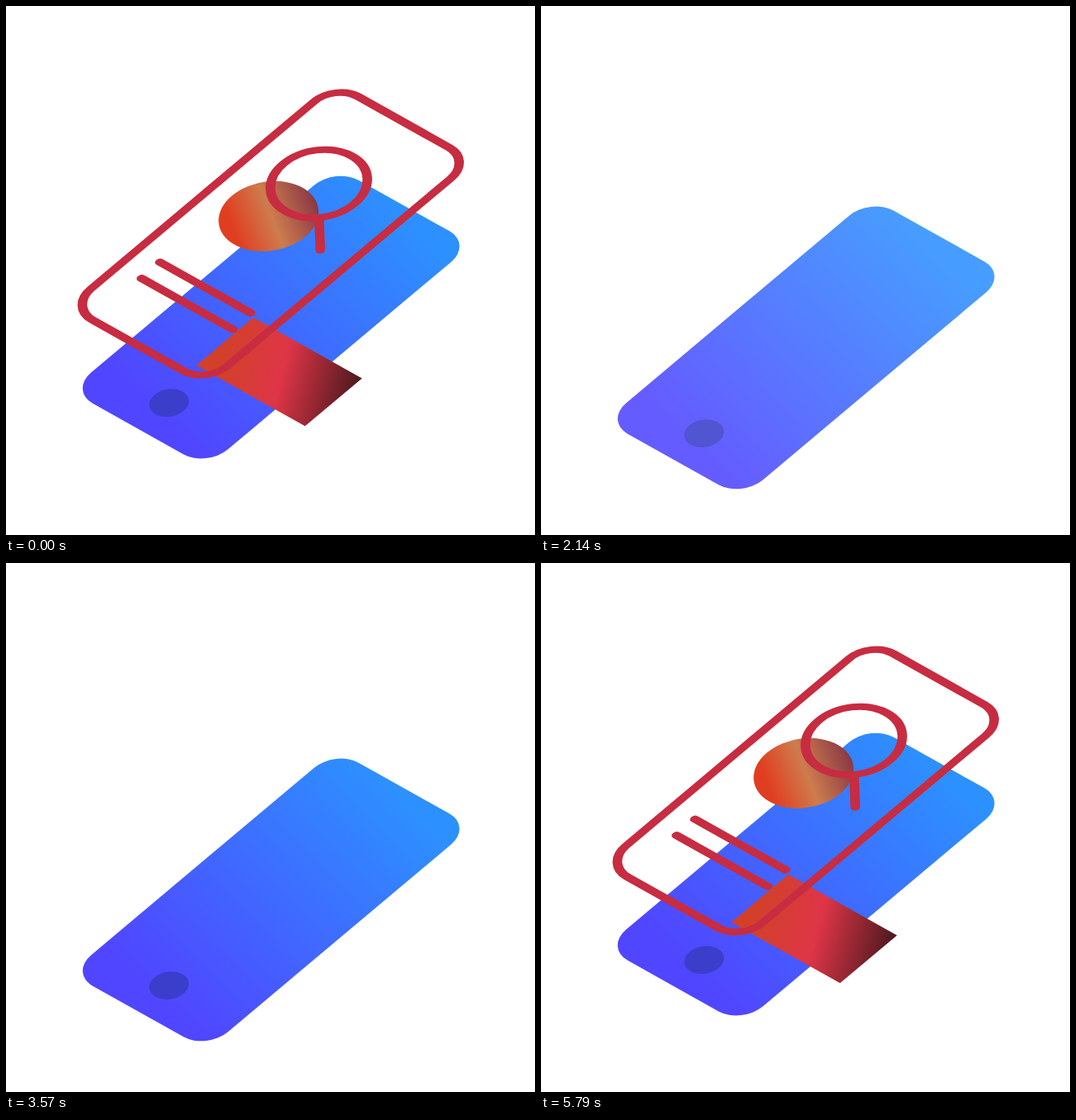
An HTML page that plays this animation: 640x640 px, repeating every 6000 ms.

```html
<!DOCTYPE html>
<html lang="en">
<head>
<meta charset="utf-8">
<title>Phone layers</title>
<style>
  html, body { margin: 0; width: 100%; height: 100%; overflow: hidden; background: #fff; }
  svg { display: block; width: 100%; height: 100%; }
  #lines { fill: none; stroke: #c72c41; stroke-width: 11.6; stroke-linecap: round; }
</style>
</head>
<body>
<svg viewBox="0 0 640 640">
  <defs>
    <linearGradient id="blue" gradientUnits="userSpaceOnUse" x1="-190" y1="-47" x2="215" y2="53">
      <stop offset="0" stop-color="#5046ff"/>
      <stop offset="1" stop-color="#2d90ff"/>
    </linearGradient>
    <linearGradient id="orange" gradientUnits="userSpaceOnUse" x1="-51" y1="-32.5" x2="51" y2="32.5">
      <stop offset=".12" stop-color="#e03e20"/>
      <stop offset=".53" stop-color="#cd7c4e"/>
      <stop offset="1" stop-color="#8a3844"/>
    </linearGradient>
    <linearGradient id="red" gradientUnits="userSpaceOnUse" x1="-55" y1="-88" x2="55" y2="88">
      <stop offset=".15" stop-color="#d2402a"/>
      <stop offset=".52" stop-color="#de3547"/>
      <stop offset=".97" stop-color="#541a20"/>
    </linearGradient>
  </defs>

  <g id="phone">
    <rect x="-236.5" y="-113" width="473" height="226" rx="38" fill="url(#blue)"/>
    <circle cx="-181.5" cy="0" r="24" fill="#3a3ecb"/>
  </g>
  <circle id="disc" r="60.5" fill="url(#orange)"/>
  <rect id="card" x="-50.7" y="-89.7" width="101.4" height="179.4" fill="url(#red)"/>
  <g id="lines">
    <path pathLength="1" d="M198.5 113H-198.5A38 38 0 0 1 -236.5 75V-75A38 38 0 0 1 -198.5 -113H198.5A38 38 0 0 1 236.5 -75V75A38 38 0 0 1 198.5 113"/>
    <circle pathLength="1" cx="97.8" cy="-11.3" r="58.6"/>
    <path pathLength="1" d="M14.3 68.6L53.3 30.3"/>
    <path pathLength="1" d="M-115 -76.5V73.5"/>
    <path pathLength="1" d="M-148.7 -75.5V75.5"/>
  </g>
</svg>
<script>
  const LOOP = 6000;
  const [phone, disc, card, lines] = ["phone", "disc", "card", "lines"].map(id => document.getElementById(id));

  // Smooth 0 to 1 ramp
  function ramp(t, start, duration) {
    const x = Math.min(1, Math.max(0, (t - start) / duration));
    return x * x * (3 - 2 * x);
  }

  // Every part lies on the same isometric plane
  function place(node, x, y, opacity = 1) {
    node.setAttribute("transform", `matrix(.68 -.571 .733 .4105 ${x} ${y})`);
    node.setAttribute("opacity", opacity);
  }

  function draw(t) {
    const sink = 64 * (ramp(t, 1750, 710) - ramp(t, 2957, 1200));
    place(phone, 320.7, 376.6 + sink, 1 - ramp(t, 2010, 600) + ramp(t, 2820, 600));

    const spread = ramp(t, 690, 800) - ramp(t, 3919, 850);
    const fade = 1 - ramp(t, 1100, 400) + ramp(t, 3970, 400);
    place(disc, 317.7 - 53 * spread, 254.3 - 29.5 * spread, fade);
    place(card, 330.5 + 75 * spread, 442.6 + 42 * spread, fade);

    const drop = 100 * (ramp(t, 12, 800) - ramp(t, 4950, 690));
    const drawn = 1 - ramp(t, 216, 795) + ramp(t, 4867, 890);
    place(lines, 320.3, 275.5 + drop, drawn > 0.0005 ? 1 : 0);
    lines.setAttribute("stroke-dasharray", `${drawn} 2`);
  }

  function tick() {
    draw(performance.now() % LOOP);
    requestAnimationFrame(tick);
  }
  tick();
</script>
</body>
</html>
```
